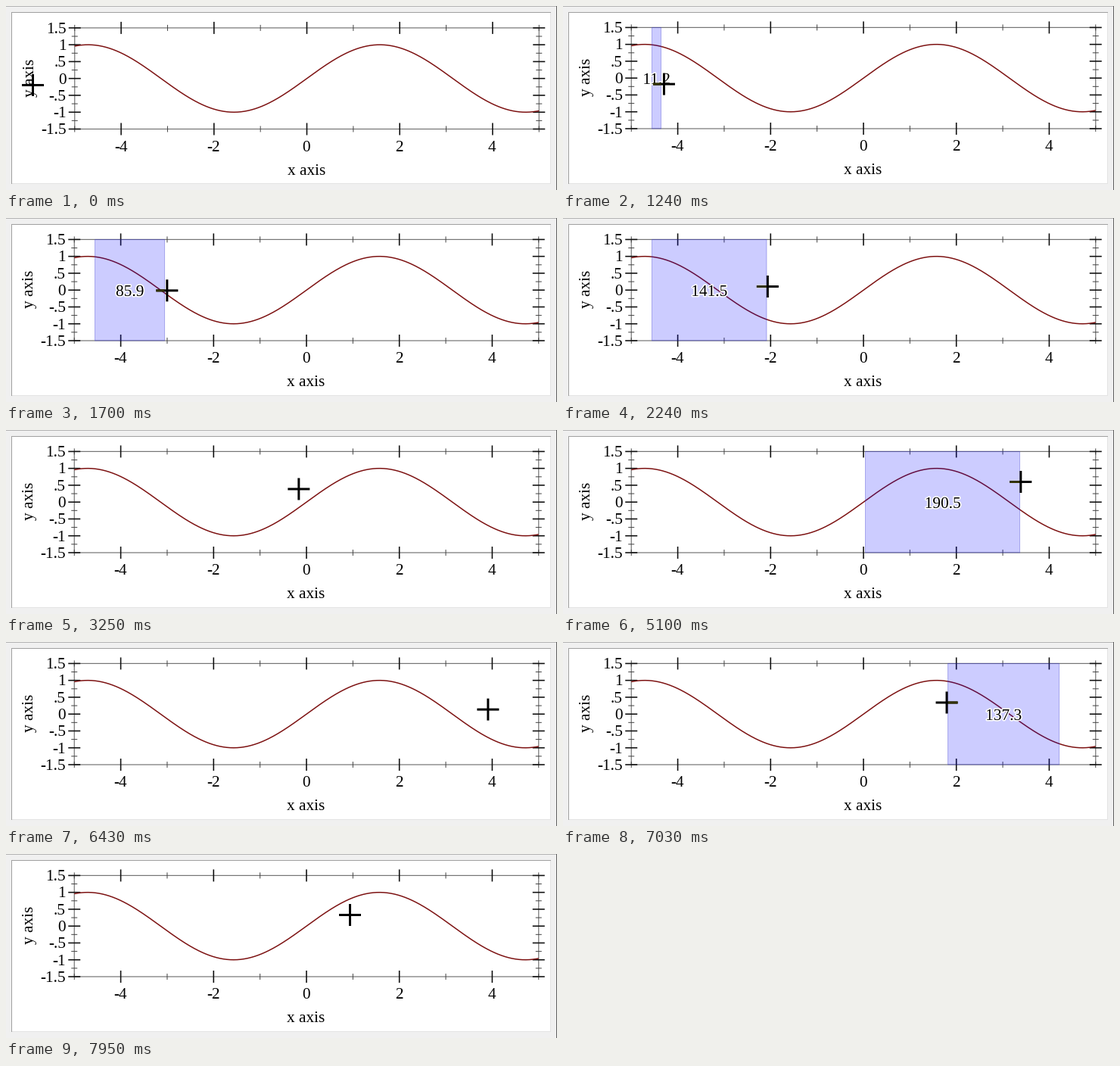
A matplotlib script that plays this animation: 728 by 243 pixels, repeating every 8000 ms.

```python
import numpy as np
import matplotlib.pyplot as plt
import matplotlib.patheffects as pe
from matplotlib.animation import FuncAnimation
from matplotlib.patches import Rectangle
from matplotlib.transforms import Affine2D

W, H, DPI = 728, 243, 100
PX = 72 / DPI                       # one pixel in points
LOOP, TICK, STEP = 8000, 20, 77.25  # ms: loop, drawing interval, screen refresh
X0, UNIT = 397, 61.35               # x of zero, pixels per x unit
Y0, AMP = 95.2, 44.53               # y of zero, pixels per y unit
LEFT, RIGHT = X0 - 5 * UNIT, X0 + 5 * UNIT
TOP, BOTTOM = Y0 - 1.5 * AMP, Y0 + 1.5 * AMP
ARM = 14.5                          # half the size of the pointer
DELAY = 0.2                         # steps the selection trails the pointer
FONT = dict(family="Liberation Serif", fontsize=21.33 * PX, color="black")

START = (35.5, 104.5)
# pointer moves: first step, last step, end x, end y
MOVES = [(0, 8, 118.5, 104.5), (15, 29, 270.4, 90.5), (34, 44, 400.5, 76.5),
         (49, 54, 509.5, 66.5), (54, 66, 604.8, 68.5), (71, 77, 656.5, 90.5),
         (82, 95, 471.5, 77.5), (102, 103, 454.5, 80.5)]
# selections: first step, step after the last, step of the mouse press
DRAGS = [(16, 31, 15), (50, 67, 49), (84, 98, 82)]

fig = plt.figure(figsize=(W / DPI, H / DPI), dpi=DPI, facecolor="#f0f0f0")
ax = fig.add_axes([0, 0, 1, 1])
ax.set(xlim=(0, W), ylim=(H, 0))
ax.axis("off")

shift = Affine2D()
plot_space = shift + ax.transData


def line(xs, ys, color, width=1, **kw):
    return ax.plot(xs, ys, color=color, lw=width * PX, snap=False,
                   solid_capstyle="butt", **kw)[0]


def label(x, y, text, **kw):
    return ax.text(x, y, text, va="baseline", transform=plot_space,
                   **FONT, **kw)


def tick_style(major):
    return dict(color="#101010" if major else "#444444",
                width=1.6 if major else 1, transform=plot_space)


def draw_window():
    ax.add_patch(Rectangle((7, 8), 713, 227, fc="white", ec="none"))
    line([7, 720], [234.5, 234.5], "#e3e3e3")
    line([719.5, 719.5], [8, 235], "#e3e3e3")
    line([7, 720], [8.5, 8.5], "#a0a0a0")
    line([7.5, 7.5], [8, 235], "#a0a0a0")
    line([0, W], [0.5, 0.5], "#b4b4b4")
    line([727.5, 727.5], [0, H], "#606060")


def draw_plot():
    axis = dict(color="#747474", width=1.2, transform=plot_space)
    line([LEFT, RIGHT, RIGHT, LEFT, LEFT],
         [TOP, TOP, BOTTOM, BOTTOM, TOP], **axis)

    for v in range(-5, 6):
        x, major = X0 + v * UNIT, v % 2 == 0
        r = 8 if major else 4
        for edge in (TOP, BOTTOM):
            line([x, x], [edge - r, edge + r], **tick_style(major))
        if major:
            label(x - 0.5, 191.4, str(v), ha="center")

    for i in range(-6, 7):
        y, major = Y0 - i * AMP / 4, i % 2 == 0
        r = 8 if major else 4
        for edge in (LEFT, RIGHT):
            line([edge - r, edge + r], [y, y], **tick_style(major))
        if major:
            text = f"{i / 4:g}".replace("0.", ".")
            label(79, y + 6.8, text, ha="right")

    label(X0 - 0.5, 222.4, "x axis", ha="center")
    label(36.3, Y0 - 1.2, "y axis", ha="center", rotation=90,
          rotation_mode="anchor")
    v = np.linspace(-5, 5, 400)
    line(X0 + v * UNIT, Y0 - AMP * np.sin(v), "#7c1010", 1.5,
         transform=plot_space)


def pointer(step):
    """Place of the pointer; each move slows down gently."""
    pos = np.array(START)
    for first, last, x, y in MOVES:
        u = np.clip((step - first) / (last - first), 0, 1)
        pos = pos + (np.array((x, y)) - pos) * (1 - (1 - u) ** 1.4)
    return pos


draw_window()
draw_plot()

band = ax.add_patch(Rectangle((0, TOP), 1, BOTTOM - TOP, snap=False,
                              fc=(0, 0, 1, 0.2), ec=(0.2, 0.2, 0.8, 0.35),
                              lw=PX, zorder=3))
angle = ax.text(0, 102.9, "", ha="center", va="baseline", zorder=4, **FONT)
angle.set_path_effects([pe.withStroke(linewidth=3.2 * PX, foreground="white")])
bar_h = line([], [], "black", 3, zorder=5)
bar_in = line([], [], "#333300", 3, zorder=6)  # arm over the selection
bar_v = line([], [], "black", 3, zorder=7)


def update(frame):
    step = int((frame * TICK + TICK - 1) // STEP)
    x, y = pointer(step)
    offset = 0.5 if step < DRAGS[0][0] else 0
    shift.clear().translate(offset, offset)

    bar_h.set_data([x - ARM, x + ARM], [y, y])
    bar_v.set_data([x, x], [y - ARM, y + ARM])

    press = next((p for first, end, p in DRAGS if first <= step < end), None)
    for part in (band, angle, bar_in):
        part.set_visible(press is not None)
    if press is not None:
        lo, hi = sorted((pointer(press)[0] - 1, pointer(step - DELAY)[0] - 1))
        band.set_x(lo)
        band.set_width(hi - lo)
        angle.set_x((lo + hi) / 2)
        angle.set_text(f"{np.degrees((hi - lo) / UNIT):.1f}")
        bar_in.set_data(np.clip([x - ARM, x + ARM], lo, hi), [y, y])
    return bar_h, bar_in, bar_v, band, angle


anim = FuncAnimation(fig, update, frames=LOOP // TICK, interval=TICK,
                     repeat=True, repeat_delay=0, blit=False)
plt.show()
```
